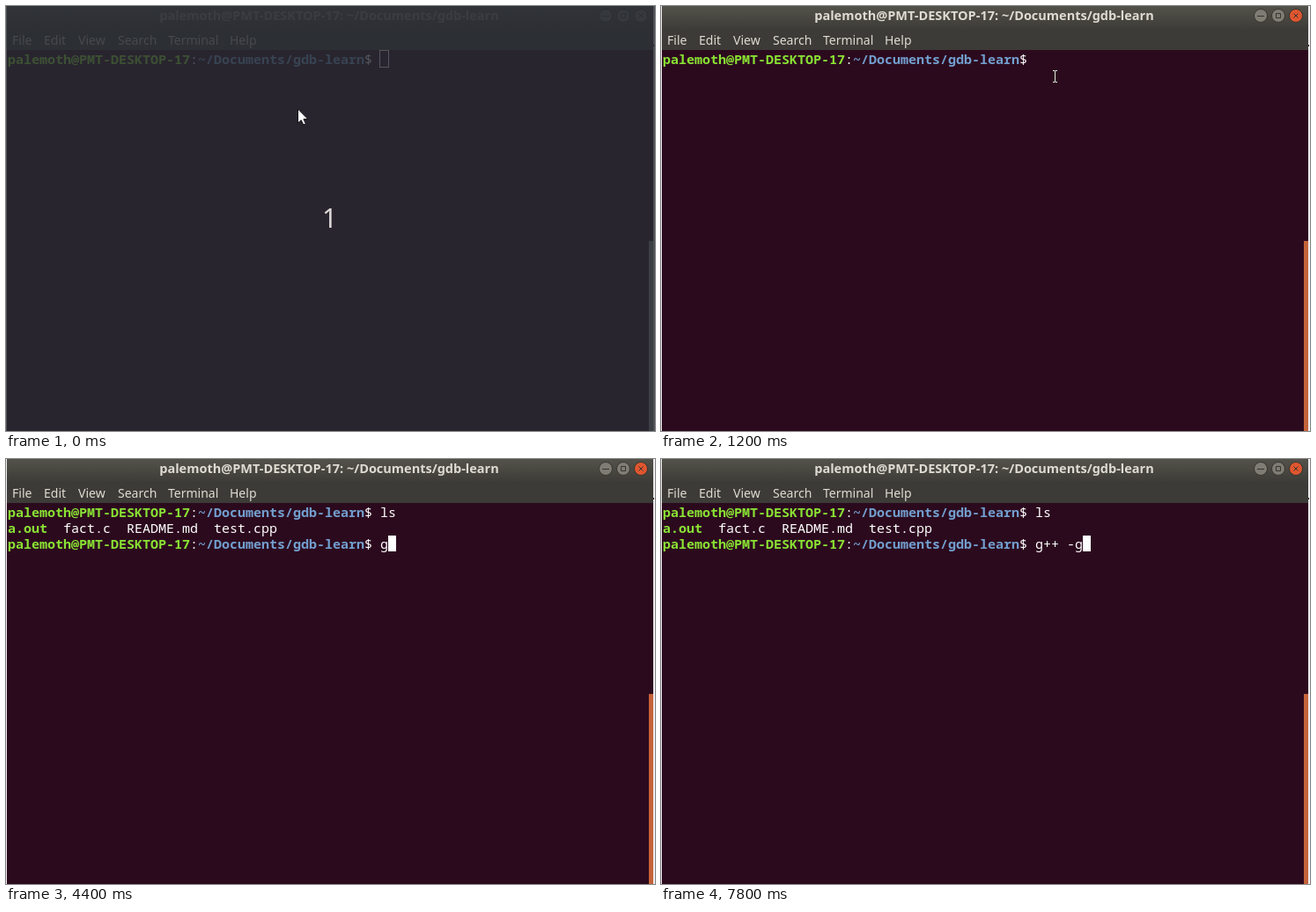
Recreate the animation shown at these times as an HTML page. Size 737x483 px, loop 8 s.

```html
<!DOCTYPE html>
<html lang="en">
<head>
<meta charset="utf-8">
<title>Terminal session</title>
<style>
  html, body { margin: 0; width: 100%; height: 100%; overflow: hidden; background: #fff; }
  svg { display: block; width: 737px; height: 483px; }
  text { white-space: pre; }
  .mono { font: 15px "Noto Sans Mono", monospace; fill: #fff; }
  .user { font-weight: 700; fill: #8ae234; }
  .path { font-weight: 700; fill: #729fcf; }
  .menu { font: 14px "Noto Sans", sans-serif; fill: #dfdbd2; }
  .title { font: 700 14.5px "Noto Sans", sans-serif; text-anchor: middle; fill: #dfdbd2; }
  .count { font: 30px "Noto Sans", sans-serif; text-anchor: middle; fill: #dcd8d8; }
  .button { fill: #7e7c73; stroke: #37362f; }
  .close { fill: #e0562f; }
  .sign { fill: none; stroke: #35342f; }
  .unfocused .title { fill: #827f76; }
  .unfocused .button { fill: #68675f; }
  .unfocused .menu, .waking .menu { fill: #bfbbb1; }
  .hollow { fill: none; stroke: #fff; }
  .solid { fill: #fff; }
</style>
</head>
<body>
<svg viewBox="0 0 737 483">
  <defs>
    <linearGradient id="header" x2="0" y2="1">
      <stop stop-color="#53524a"/>
      <stop offset="1" stop-color="#3c3b37"/>
    </linearGradient>
  </defs>

  <g id="window">
    <rect width="737" height="483" fill="#efecef"/>
    <rect x="1" width="734" height="483" fill="#2c0a1e"/>
    <rect x="1" width="734" height="27" fill="url(#header)"/>
    <rect x="1" y="26" width="734" height="24" fill="#3c3b37"/>
    <rect x="735" y="44" width="1" height="2" fill="#222"/>

    <text class="title" x="367" y="16">palemoth@PMT-DESKTOP-17: ~/Documents/gdb-learn</text>
    <g>
      <circle class="button" cx="681" cy="11" r="7.5"/>
      <circle class="button" cx="701" cy="11" r="7.5"/>
      <circle class="button close" cx="721" cy="11" r="7.5"/>
      <path class="sign" d="M677 11.5h8M698.5 8.5h5v5h-5zM718.5 8.5l5 5m0-5l-5 5"/>
    </g>

    <g class="menu">
      <text x="7" y="44">File</text>
      <text x="43" y="44">Edit</text>
      <text x="82" y="44">View</text>
      <text x="127" y="44">Search</text>
      <text x="184" y="44">Terminal</text>
      <text x="254" y="44">Help</text>
    </g>

    <text id="prompt" class="mono" x="2" y="66"><tspan class="user">palemoth@PMT-DESKTOP-17</tspan>:<tspan class="path">~/Documents/gdb-learn</tspan>$</text>
    <text id="list" class="mono" x="425" y="66"></text>
    <g id="output">
      <text class="mono" x="2" y="84"><tspan class="user">a.out</tspan>  fact.c  README.md  test.cpp</text>
      <use href="#prompt" y="36"/>
      <text id="compile" class="mono" x="425" y="102"></text>
    </g>
    <rect id="caret"/>
    <rect id="scrollbar" x="730" y="267" width="5" height="216"/>
  </g>

  <path id="beam" fill="none" stroke="#e6f2e1" d="M-2.5 -6.5h2m1 0h2M-2.5 6.5h2m1 0h2M0 -6.5v13"/>

  <g id="countdown">
    <rect width="737" height="483" fill="#282c34" fill-opacity=".8"/>
    <text class="count" x="367.5" y="252">1</text>
    <path d="M331.5 117v16l3.7-3.3 2.5 5.3 2.7-1.2-2.5-5.2h5z" fill="#fff" stroke="#101014"/>
  </g>
</svg>

<script>
const LOOP = 8000;
const CELL = 9;
const FOCUS = 600;
const AWAKE = 800;
const ENTER = 2100;
const HIDE_BEAM = 1700;

const listKeys = [[0, ""], [1700, "l"], [1900, "ls"]];
const compileKeys = [[0, ""], [4400, "g"], [5300, "g++"], [5900, "g++ "], [6900, "g++ -"], [7400, "g++ -g"]];
const caretOff = [[1200, 1700], [2700, 3300], [6200, 6500], [7500, 7800]];
const beamPath = [[100, 333, 119], [300, 345, 114], [700, 444, 74], [900, 449, 79], [1200, 447, 80]];

const $ = id => document.getElementById(id);
const show = (id, on) => $(id).style.display = on ? "" : "none";
const typed = (keys, t) => keys.filter(([time]) => t >= time).pop()[1];

function setAttrs(id, attrs) {
  for (const name in attrs) $(id).setAttribute(name, attrs[name]);
}

function beamAt(t) {
  const next = beamPath.findIndex(([time]) => t < time);
  if (next < 0) return beamPath[beamPath.length - 1].slice(1);
  if (next === 0) return beamPath[0].slice(1);
  const [t0, x0, y0] = beamPath[next - 1];
  const [t1, x1, y1] = beamPath[next];
  const k = (t - t0) / (t1 - t0);
  const eased = k * k * (3 - 2 * k);
  return [Math.round(x0 + (x1 - x0) * eased), Math.round(y0 + (y1 - y0) * eased)];
}

function drawCaret(t, text) {
  const x = 425 + text.length * CELL;
  const y = t < ENTER ? 51 : 87;
  const focused = t >= FOCUS;
  setAttrs("caret", focused
    ? { class: "solid", x, y, width: CELL, height: 18 }
    : { class: "hollow", x: x - 0.5, y: y - 0.5, width: CELL + 1, height: 19 });
  show("caret", !caretOff.some(([from, to]) => t >= from && t < to));
}

function render(now) {
  const t = Math.floor((now % LOOP) / 100) * 100;
  const list = typed(listKeys, t);
  const compile = typed(compileKeys, t);

  show("countdown", t < 100);
  show("output", t >= ENTER);
  show("beam", t >= 100 && t < HIDE_BEAM);
  $("window").setAttribute("class", t < FOCUS ? "unfocused" : t < AWAKE ? "waking" : "");
  $("list").textContent = list;
  $("compile").textContent = compile;
  drawCaret(t, t < ENTER ? list : compile);
  $("scrollbar").setAttribute("fill", t < AWAKE ? "#8d908c" : "#c4633a");

  const [x, y] = beamAt(t);
  $("beam").setAttribute("transform", `translate(${x + 0.5} ${y})`);
}

const start = performance.now();
function tick() {
  render(performance.now() - start);
  requestAnimationFrame(tick);
}
tick();
</script>
</body>
</html>
```
